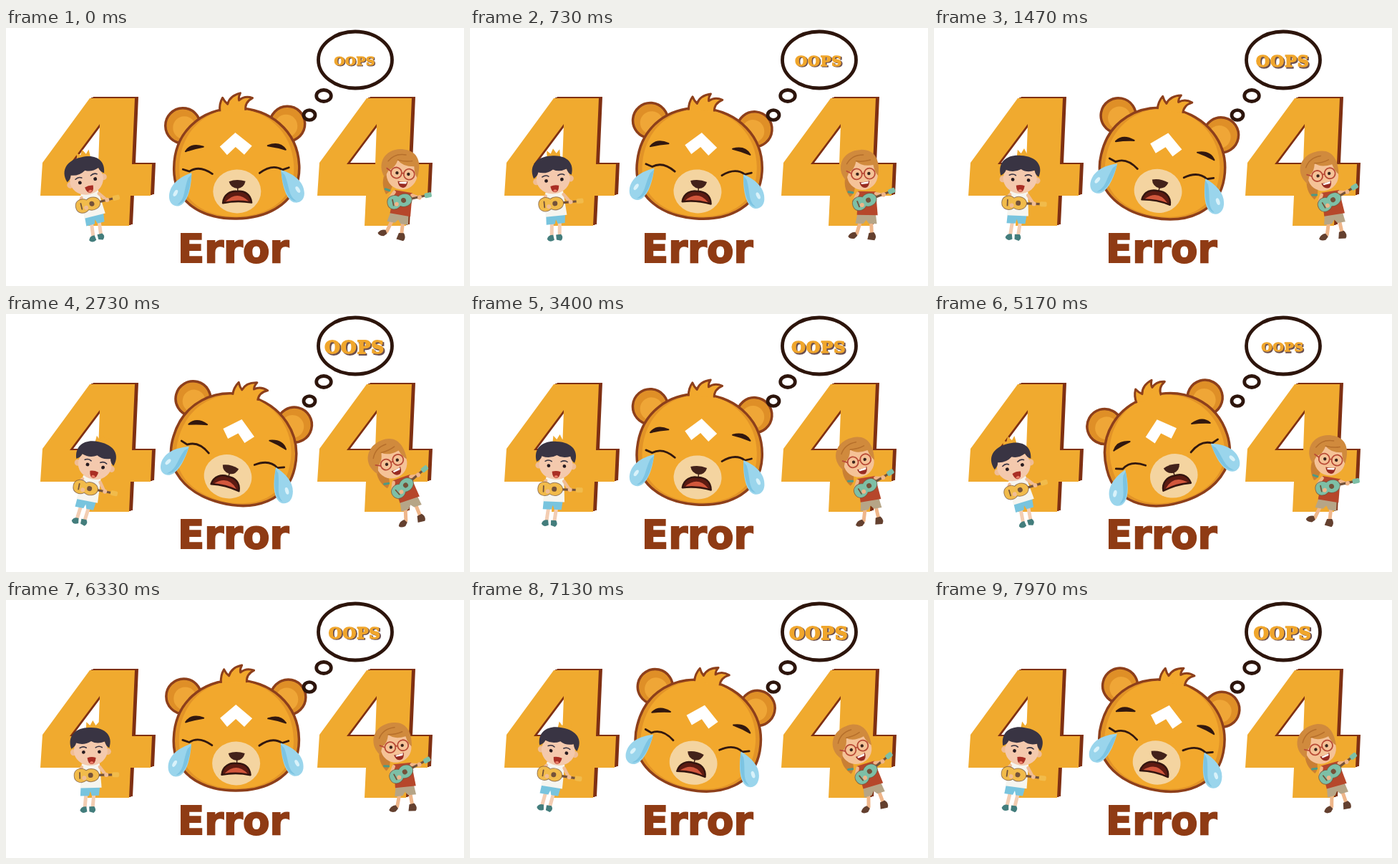
Animation of 640 by 360 pixels, one loop 8 s. Source, as an HTML page:

```html
<!DOCTYPE html>
<html lang="en">
<head>
<meta charset="utf-8">
<title>404 Error</title>
<style>
  html, body { margin: 0; width: 100%; height: 100%; overflow: hidden; background: #fff; }
  svg { display: block; width: 100vw; height: 100vh; }
  .line { fill: none; stroke-linecap: round; stroke-linejoin: round; }
  .error { font: bold 54.5px "DejaVu Sans", sans-serif; fill: #8f3b14; stroke: #8f3b14; stroke-width: 2; }
  .oops { font: bold 22px "DejaVu Serif", serif; letter-spacing: 1px; text-anchor: middle; stroke-width: 1.6; }
</style>
</head>
<body>
<svg viewBox="0 0 640 360">
  <defs>
    <path id="four" fill-rule="evenodd" d="M117 98H180L176 190H204L202 234H174L172 276H114L116 234H48L51 188Z M131 134L89 190H129Z"/>
    <g id="digit">
      <use href="#four" x="5" y="-2" fill="#7f3013"/>
      <use href="#four" x="2.5" y="-1" fill="#7f3013"/>
      <use href="#four" fill="#f0aa2f"/>
    </g>
    <g id="ear">
      <circle cx="248" cy="135" r="24.5" fill="#df8f27" stroke="#8d3f1b" stroke-width="3.5"/>
      <circle cx="250" cy="138" r="16" fill="#efa637"/>
    </g>
    <g id="eye" class="line" stroke="#32180f">
      <path d="M251 171Q259 159 276 165Q263 167 251 171Z" fill="#32180f" stroke-width="2"/>
      <path d="M247 196L256 199Q270 190 288 203" stroke-width="2.8"/>
    </g>
    <g id="tear">
      <path d="M259 201C241 207 227 218 227 234C227 243 233 248 240 247C251 245 258 226 259 201Z" fill="#9ad5ec"/>
      <path d="M254 208C247 226 250 237 238 245C250 244 256 228 259 203Z" fill="#7cc4e2"/>
      <ellipse cx="236" cy="229" rx="2.5" ry="5" fill="#d9f2fa" transform="rotate(30 236 229)"/>
    </g>
    <g id="guitar">
      <path class="line" d="M10 0H36" stroke="#74523a" stroke-width="3.2"/>
      <rect x="35" y="-3.5" width="10" height="7" rx="2" fill="currentColor"/>
      <path d="M-18 0C-18 -10 -7 -12 -1 -7C5 -11 16 -9 17 0C16 9 5 11 -1 7C-7 12 -18 10 -18 0Z" fill="currentColor" stroke="#74523a" stroke-opacity=".7"/>
      <circle cx="5" r="3.5" fill="#74523a"/>
      <path class="line" d="M-10 -4V4" stroke="#74523a" stroke-width="1.8"/>
    </g>
  </defs>

  <use href="#digit"/>
  <use href="#digit" x="387"/>
  <text class="error" x="240" y="327">Error</text>

  <g id="bear">
    <use href="#ear"/>
    <use href="#ear" transform="matrix(-1 0 0 1 642 0)"/>
    <path d="M321 112C273 112 236 144 234.500 193C232 241 272 266 321 266C370 266 411 241 409.500 193C408 144 369 112 321 112Z" fill="#e29327" stroke="#8d3f1b" stroke-width="3.5"/>
    <path d="M321 113C278 113 243 146 242 193C240 239 276 263 321 263C367 263 404 239 402 193C401 146 364 113 321 113Z" fill="#f2a82d"/>
    <path d="M300 116C299 107 301 102 304 97Q307 103 311 106C313 98 320 93 329 91Q326 96 327 101Q335 94 346 98C338 102 335 107 336 115" fill="#f2a82d" stroke="#8d3f1b" stroke-width="3" stroke-linejoin="round"/>
    <path d="M321 146L344 165L333 177L321 166L309 177L299 165Z" fill="#fff"/>
    <use href="#eye"/>
    <use href="#eye" transform="matrix(-1 0 0 1 642 0)"/>
    <ellipse cx="322" cy="228" rx="33.5" ry="30.5" fill="#f4d4a0"/>
    <path d="M311 214Q322 210 334 214Q332 223 323 224Q313 223 311 214Z" fill="#43221a"/>
    <path class="line" d="M323 223V229" stroke="#43221a" stroke-width="1.5"/>
    <path d="M302 244C303 232 313 227 322 228C332 227 341 232 342 244Q322 240 302 244Z" fill="#5c1b12" stroke="#34150f" stroke-width="2.5" stroke-linejoin="round"/>
    <path d="M306 242Q322 226 338 242Q322 239 306 242Z" fill="#d2573c"/>
    <use href="#tear"/>
    <use href="#tear" transform="matrix(-1 0 0 1 643 -2)"/>
  </g>

  <g class="line" stroke="#2d150c" stroke-width="4.8">
    <ellipse cx="488" cy="44.500" rx="51.500" ry="39.500"/>
    <ellipse cx="444" cy="94.500" rx="10.300" ry="8"/>
    <ellipse cx="424" cy="121.500" rx="8" ry="6.800"/>
  </g>
  <g id="oops" class="oops">
    <text x="2" y="9.500" fill="#6b4f50" stroke="#6b4f50">OOPS</text>
    <text x=".3" y="8" fill="#f0a62c" stroke="#f0a62c">OOPS</text>
  </g>

  <g id="boy">
    <path d="M113 184L114 170L119 175L123 168L127 175L132 170V184Z" fill="#f0aa2f"/>
    <path class="line" d="M111 270L109 288M122 270L120 288" stroke="#f3cdb2" stroke-width="5"/>
    <path d="M102 293Q104 287 111 288L112 295Q105 299 102 293ZM115 288L122 288Q126 293 121 297L115 295Z" fill="#437d7c"/>
    <path d="M104 258H131L129 273H119L117 267L115 273H103Z" fill="#78c4de"/>
    <path d="M106 228H131L133 262H103Z" fill="#f6f5ef"/>
    <path class="line" d="M106 233L100 242L109 248M131 233L139 244" stroke="#f0bd95" stroke-width="4.5"/>
    <circle cx="95" cy="212" r="4.500" fill="#f0bd95"/>
    <circle cx="143" cy="212" r="4.500" fill="#f0bd95"/>
    <ellipse cx="119" cy="210" rx="23.500" ry="21" fill="#f4c9ad"/>
    <path d="M92 207C86 188 100 177 119 178C141 178 151 191 145 207Q140 204 139 198Q128 202 120 197Q110 203 99 199Q98 204 92 207Z" fill="#393443"/>
    <path class="line" d="M104 206Q109 203 113 206M126 206Q131 203 135 206" stroke="#393443" stroke-width="1.600"/>
    <circle cx="109" cy="212" r="2.400" fill="#271b20"/>
    <circle cx="131" cy="212" r="2.400" fill="#271b20"/>
    <path d="M114 220Q120 218 126 220Q125 229 120 229Q115 229 114 220Z" fill="#a92e24"/>
    <path d="M117 227Q120 223 123 227Q120 230 117 227Z" fill="#ec7d68"/>
    <use href="#guitar" transform="translate(113 244.500)" color="#f1bb4b"/>
    <circle cx="140" cy="244.500" r="3" fill="#f0bd95"/>
    <circle cx="109" cy="248" r="3" fill="#f0bd95"/>
  </g>

  <g id="girl">
    <path class="line" d="M546 270L541 287M561 270L562 287" stroke="#efb68a" stroke-width="5"/>
    <path d="M529 291Q532 285 539 285L542 290L538 294Q531 295 529 291ZM558 286L565 285Q570 291 566 296L556 295Z" fill="#64402f"/>
    <path d="M542 258H567L569 273H558L554 268L550 273H539Z" fill="#b6a587"/>
    <path d="M542 228H567L570 261H541Z" fill="#b6472b"/>
    <path d="M525 205Q520 222 531 236Q540 230 537 214Z" fill="#c97f34"/>
    <path class="line" d="M529 229L535 230" stroke="#4c9a86" stroke-width="3"/>
    <path class="line" d="M542 231L537 241L548 247M567 231L578 233" stroke="#efb68a" stroke-width="4.500"/>
    <ellipse cx="548" cy="205" rx="21.500" ry="21" fill="#f5c297"/>
    <path d="M525 213C509 195 520 171 545 170C565 169 573 184 570 206Q565 201 563 191Q547 194 539 186Q537 198 529 202Z" fill="#d08a3d"/>
    <path class="line" d="M526 190Q533 177 549 177M539 186Q550 187 559 184" stroke="#b66f2b" stroke-width="1.500"/>
    <g class="line" stroke="#b94b36" stroke-width="1.800">
      <circle cx="540" cy="204" r="7.500"/>
      <circle cx="558" cy="203" r="7.500"/>
      <path d="M547.500 203H550.500M532 203L526 200"/>
    </g>
    <circle cx="541" cy="204" r="2.200" fill="#3a241c"/>
    <circle cx="557" cy="203" r="2.200" fill="#3a241c"/>
    <path d="M544 215Q552 216 558 213Q558 223 552 223Q546 223 544 215Z" fill="#982b22"/>
    <path d="M546 216L557 214L556 217L547 218Z" fill="#fff"/>
    <use href="#guitar" transform="translate(552 242) rotate(-22)" color="#7dbfa6"/>
    <circle cx="578" cy="232" r="3" fill="#efb68a"/>
    <circle cx="548" cy="247" r="3" fill="#efb68a"/>
  </g>
</svg>
<script>
  const LOOP = 8000;
  const $ = id => document.getElementById(id);

  // Linear swings between [time, value] turning points.
  function swing(points, t) {
    const i = points.findIndex(([time]) => time > t);
    const [t0, v0] = points[i - 1], [t1, v1] = points[i];
    return v0 + (v1 - v0) * (t - t0) / (t1 - t0);
  }

  const turns = (start, high, low) =>
    [[0, start], [2500, high], [5000, low], [7500, high], [10000, low]];

  const tilts = [
    ["bear", 321, 180, [[0, -1], [2450, 18.5], [5000, -18.5], [7600, 18.5], [10150, -18.5]]],
    ["boy", 122, 237, turns(-14, 14, -19)],
    ["girl", 554, 234, turns(10, -22, 12)],
  ].map(([id, x, y, points]) => ({ node: $(id), x, y, points }));
  const oopsScale = turns(0.77, 1.16, 0.77);

  function draw(now) {
    const t = now % LOOP;
    for (const { node, x, y, points } of tilts)
      node.setAttribute("transform", `rotate(${swing(points, t)} ${x} ${y})`);
    $("oops").setAttribute("transform", `translate(487 46) scale(${swing(oopsScale, t)})`);
  }

  const start = performance.now();
  function tick() {
    draw(performance.now() - start);
    requestAnimationFrame(tick);
  }
  tick();
</script>
</body>
</html>
```
